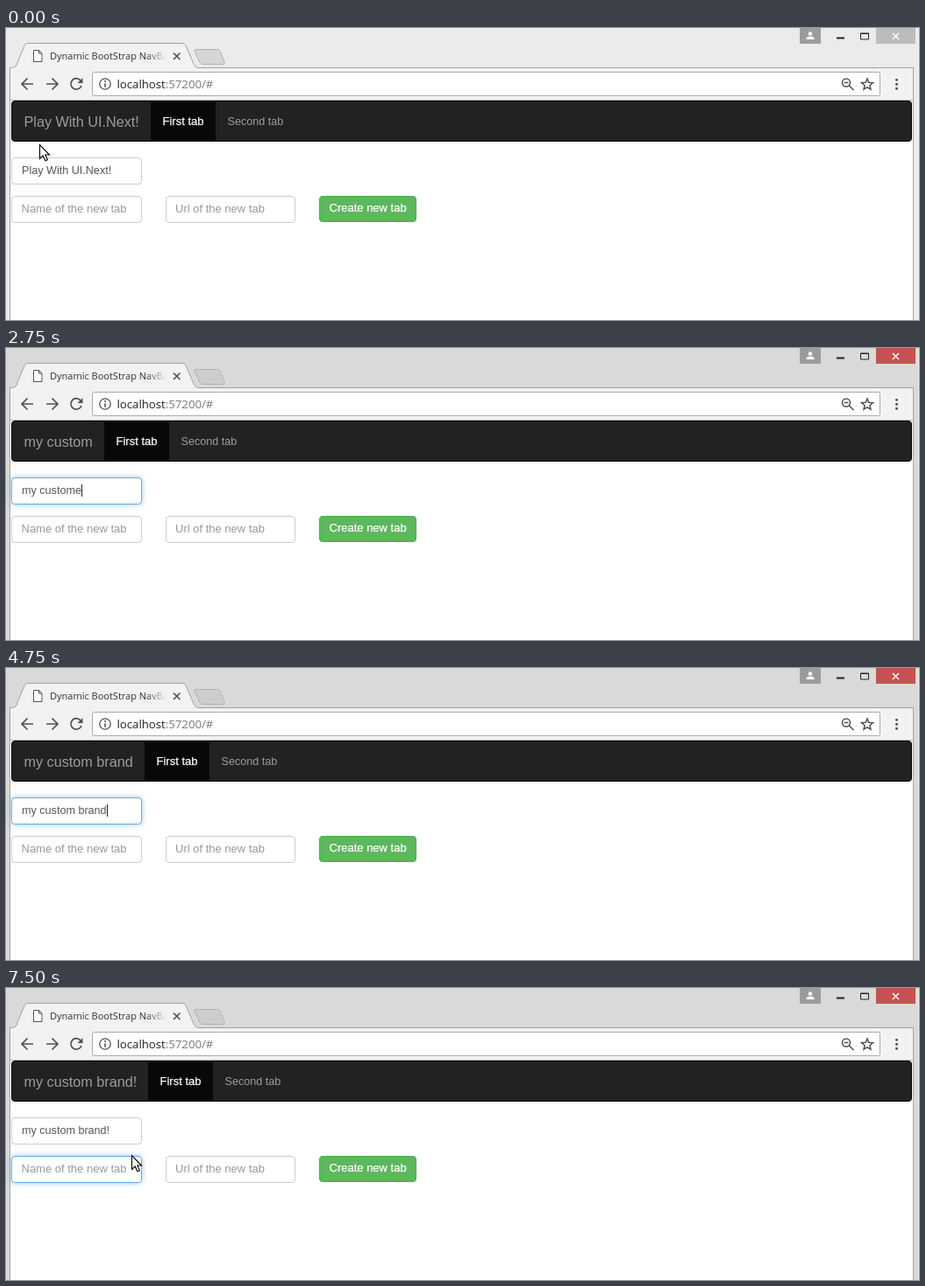
Animation of 1041x334 px, one loop 8 s. Source, as an HTML page:

```html
<!DOCTYPE html>
<html lang="en">
<head>
<meta charset="utf-8">
<title>Dynamic navbar</title>
<style>
  html, body { margin: 0; width: 100%; height: 100%; overflow: hidden; }
  svg { display: block; width: 1041px; height: 334px; }
  text { font-family: "Liberation Sans", Arial, sans-serif; font-size: 12.6px; }
  .ui { font-family: "Open Sans", sans-serif; }
  .hint { font-size: 13px; fill: #999; }
  .strong { font-size: 13px; fill: #fff; stroke: #fff; stroke-width: .25px; }
  .line { fill: none; stroke: #505050; stroke-width: 1.7; }
  .field { fill: #fff; stroke: #ccc; }
  .field.focus { stroke: #66afe9; filter: drop-shadow(0 0 3px rgba(102, 175, 233, .7)); }
</style>
</head>
<body>
<svg viewBox="0 0 1041 334">
  <defs>
    <linearGradient id="fade" gradientUnits="userSpaceOnUse" x1="160" x2="184">
      <stop stop-color="#333"/><stop offset="1" stop-color="#333" stop-opacity="0"/>
    </linearGradient>
    <clipPath id="titleClip"><rect x="45" y="20" width="138" height="24"/></clipPath>
  </defs>

  <!-- window frame -->
  <rect id="frame" width="1041" height="334"/>
  <path d="M1040.5 0V334" stroke="#f0f0f0"/>
  <rect x="905" width="24" height="18" fill="#9c9c9c"/>
  <circle cx="917" cy="6.5" r="2.3" fill="#fff"/>
  <path d="M912.5 13v-1.5q1-2 4.5-2t4.5 2V13z" fill="#fff"/>
  <path d="M947 11.5h9" stroke="#222" stroke-width="2"/>
  <path d="M974.5 6v7h9V6zM974 6.5h10" fill="none" stroke="#222"/>
  <rect id="close" x="992" width="45" height="18"/>
  <path d="M1011 6l7 7m0-7l-7 7" stroke="#fff" stroke-width="1.5"/>

  <!-- browser tab and toolbar -->
  <path id="newTab" d="M216.5 24.5H241q2 0 3 2l5 12q1 3-2 3H224q-2 0-3-2l-6-13q-1-2 1.500-2z" stroke="#b2b2b2"/>
  <rect x="5" y="45" width="1029" height="289" fill="#fff"/>
  <rect x="5" y="46" width="1029" height="37" fill="#f2f2f2"/>
  <path d="M7 46q4-1 5-4L21 20q1-2.500 4-2.500H201q3 0 4 2.500l9 21q2 4.500 5 5z" fill="#f2f2f2"/>
  <path d="M4.500 334V45.500H7q4 0 5-3.500L21 20q1-2.500 4-2.500H201q3 0 4 2.500l9 21q2 4.500 5 4.500H1034.500V334" fill="none" stroke="#a2a2a2"/>
  <path d="M5 82.500H1034" stroke="#b8b8b8"/>
  <path d="M31.500 25.500h6l3.500 3.500v9.500h-9.500zm6 0v3.500h3.500" fill="#fff" stroke="#555"/>
  <text class="ui" x="50" y="36" style="font-size:11px" fill="url(#fade)" clip-path="url(#titleClip)">Dynamic BootStrap NavBar</text>
  <path class="line" d="M191 28.500l7.500 7.500m0-7.500l-7.500 7.500"/>
  <path class="line" d="M31 64H18m6.500-6.500L18 64l6.500 6.500M46 64h13m-6.500-6.500L59 64l-6.500 6.500"/>
  <path class="line" d="M85 60a6.200 6.200 0 1 0 1 6"/>
  <path d="M87.500 57v6h-6z" fill="#505050"/>
  <rect x="98.500" y="50.500" width="898" height="27" rx="2" fill="#fff" stroke="#aaa"/>
  <circle class="line" cx="113" cy="64" r="6.200" style="stroke-width:1.300"/>
  <path d="M113 60v2m0 1.200v4.600" stroke="#505050" stroke-width="1.600"/>
  <text class="ui" x="126.500" y="69" style="font-size:13.200px" fill="#222">localhost<tspan fill="#777">:57200/#</tspan></text>
  <g class="line" style="stroke-width:1.500">
    <circle cx="958" cy="62.500" r="4.500"/>
    <path d="M961.500 66l5 5M955.500 62.500h5"/>
    <path d="M982 58l1.800 4.200 4.700.4-3.600 3.100 1.100 4.500-4-2.400-4 2.400 1.100-4.500-3.600-3.100 4.700-.4z"/>
  </g>
  <path d="M1015.500 59.200h.01m-.01 5h.01m-.01 5h.01" stroke="#505050" stroke-width="3" stroke-linecap="round"/>

  <!-- page -->
  <rect x="6.500" y="83.500" width="1026" height="46" rx="3.500" fill="#222" stroke="#080808"/>
  <text id="brand" x="20.500" y="113" style="font-size:16.200px" fill="#9d9d9d"></text>
  <g id="tabs">
    <rect y="84" width="74" height="45" fill="#080808"/>
    <text class="strong" x="13.500" y="111">First tab</text>
    <text x="87.500" y="111" fill="#9d9d9d">Second tab</text>
  </g>
  <rect class="field" id="brandField" x="6.500" y="148.500" width="148" height="30" rx="3.500"/>
  <rect id="selection" x="18" y="155" height="16" fill="#3390ff"/>
  <text id="typed" x="18" y="167"></text>
  <path id="caret" d="M.5 156v14" stroke="#222"/>
  <rect class="field" id="nameField" x="6.500" y="192.500" width="148" height="30" rx="3.500"/>
  <text class="hint" x="17.500" y="211">Name of the new tab</text>
  <rect class="field" x="182.500" y="192.500" width="147" height="30" rx="3.500"/>
  <text class="hint" x="193" y="211">Url of the new tab</text>
  <rect x="357.500" y="192.500" width="110" height="29" rx="3.500" fill="#5cb85c" stroke="#4cae4c"/>
  <text class="strong" x="368.500" y="210">Create new tab</text>

  <path id="arrow" d="M.5 .5v16l3.700-3.500 2.600 5.700 2.500-1.100-2.500-5.600h4.700z" fill="#fff" stroke="#000" stroke-width="1.100"/>
  <path id="beam" d="M-3-7.500h2.500l.5.500.5-.5H3M0-7V7M-3 7.500h2.500L0 7l.5.500H3" fill="none" stroke="#222"/>
</svg>
<script>
const LOOP = 8000;
const START = "Play With UI.Next!";
const DONE = "my custom brand!";
const el = id => document.getElementById(id);

// Each entry is the start time and what changes from the entry before.
const steps = [
  [0, { typed: START, brand: START, focus: "", active: false, arrow: [38, 133] }],
  [250, { arrow: null, beam: [72, 164] }],
  [500, { active: true, focus: "brand", beam: [124, 164] }],
  [750, { selected: true }],
  [1500, { selected: false, beam: null, typed: "m" }],
  [1750, { typed: "my", brand: "m" }],
  [2000, { typed: "my cu", brand: "my c" }],
  [2250, { typed: "my cust", brand: "my cus" }],
  [2500, { typed: "my custom", brand: "my custo" }],
  [2750, { typed: "my custome", brand: "my custom" }],
  [3000, { typed: "my custome b", brand: "my custome" }],
  [3250, { typed: "my custome br", brand: "my custome b" }],
  [3500, { typed: "my custome", brand: "my custome" }],
  [3750, { typed: "my custom", brand: "my custom" }],
  [4000, { typed: "my custom b" }],
  [4250, { typed: "my custom bra", brand: "my custom br" }],
  [4500, { typed: "my custom brand", brand: "my custom bran" }],
  [4750, { brand: "my custom brand" }],
  [5250, { typed: DONE }],
  [5500, { brand: DONE }],
  [6000, { beam: [78, 166] }],
  [6250, { beam: [80, 177] }],
  [6500, { beam: [85, 207] }],
  [6750, { beam: null }],
  [7000, { beam: [85, 207], focus: "name" }],
  [7250, { beam: [120, 204] }],
  [7500, { beam: null, arrow: [143, 191] }]
];

function show(id, visible) {
  el(id).style.display = visible ? "" : "none";
}

function place(id, point) {
  show(id, point);
  if (point) el(id).setAttribute("transform", `translate(${point})`);
}

function render(state) {
  el("frame").setAttribute("fill", state.active ? "#d9d9d9" : "#ebebeb");
  el("newTab").setAttribute("fill", state.active ? "#cdcdcd" : "#d6d6d6");
  el("close").setAttribute("fill", state.active ? "#c75050" : "#bcbcbc");

  el("brand").textContent = state.brand;
  place("tabs", [Math.round(33.8 + el("brand").getComputedTextLength()), 0]);

  el("typed").textContent = state.typed;
  el("typed").setAttribute("fill", state.selected ? "#fff" : "#555");
  const width = el("typed").getComputedTextLength();
  show("selection", state.selected);
  el("selection").setAttribute("width", width);
  place("caret", state.focus === "brand" && !state.selected && [Math.round(18 + width), 0]);

  for (const name of ["brand", "name"])
    el(name + "Field").classList.toggle("focus", state.focus === name);
  place("arrow", state.arrow);
  place("beam", state.beam);
}

let shown = 0;
function tick() {
  const time = performance.now() % LOOP;
  const past = steps.filter(([start]) => start <= time);
  if (past.length !== shown) {
    shown = past.length;
    render(Object.assign({}, ...past.map(([, change]) => change)));
  }
  requestAnimationFrame(tick);
}
tick();
</script>
</body>
</html>
```
